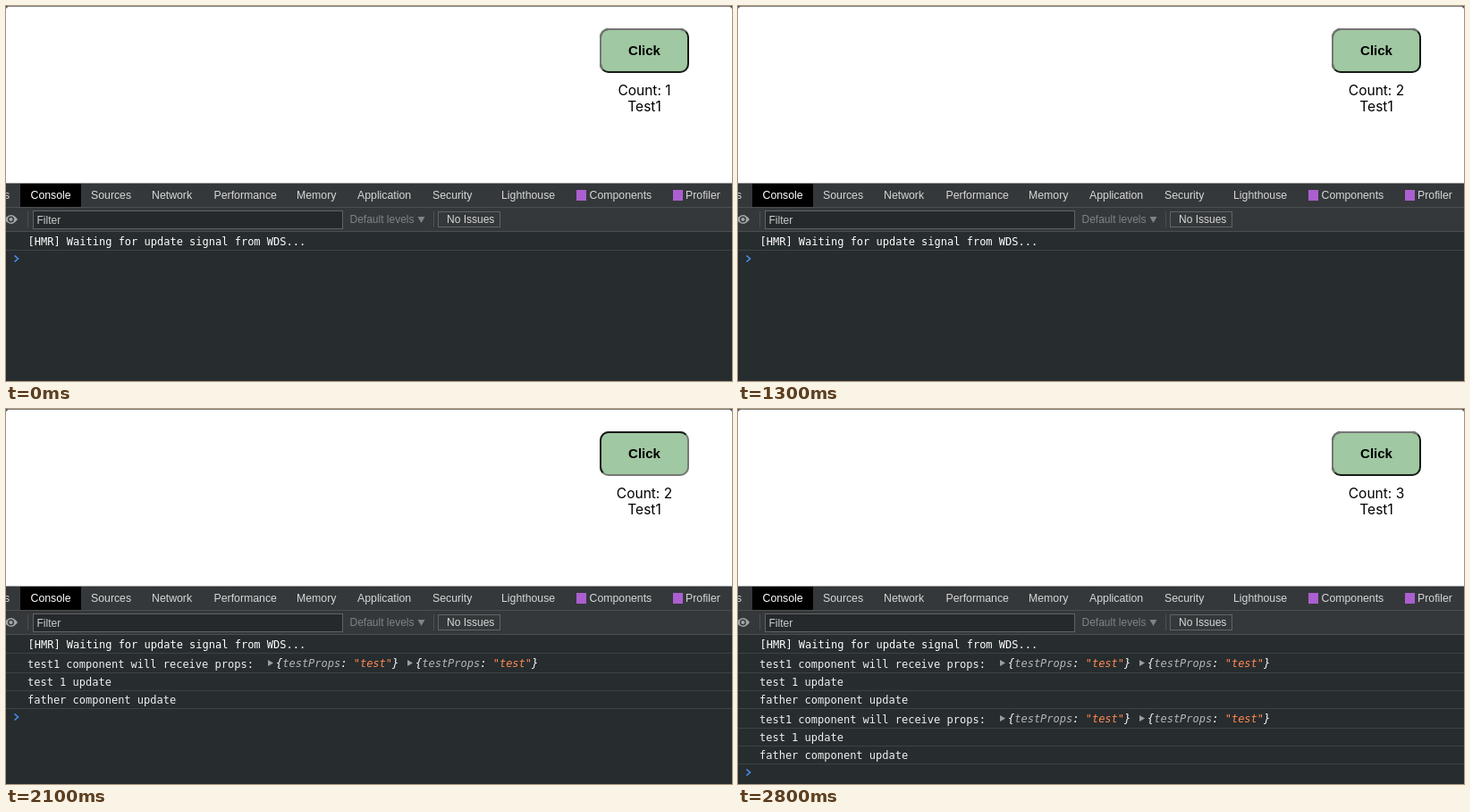
Animation of 812x420 px, one loop 3 s. Source, as an HTML page with a canvas:

```html
<!DOCTYPE html>
<html lang="en">
<head>
<meta charset="utf-8">
<title>Console updates</title>
<style>
  html, body { margin: 0; width: 100%; height: 100%; overflow: hidden; background: #fff; }
  canvas { display: block; }
</style>
</head>
<body>
<canvas id="stage" width="812" height="420"></canvas>
<script>
const W = 812, H = 420, LOOP = 3000;
const ctx = document.getElementById('stage').getContext('2d');

const SANS = '"Liberation Sans", Arial, sans-serif';
const MONO = '12px "DejaVu Sans Mono", monospace';
const PAGE = '15.5px Inter, sans-serif';
const UI = '12px ' + SANS;
const TAB = '12.3px ' + SANS;

const C = {
  body: '#272c2f', bar: '#35383a', line: '#4b4f51', row: '#3d4245',
  tab: '#d6d8d9', log: '#f0f1f2', bright: '#fff', dim: '#7f8385',
  key: '#b4b7b9', value: '#ff8a52', prompt: '#4a90f2', icon: '#ab5fd0', eye: '#a2a6a8'
};

// Start times of each click's effects
const COUNT_AT = [1300, 2200];
const LOG_AT = [1400, 2200];
const PRESS = [2100, 2200];

const TABS = [
  ['s', -2], ['Sources', 95], ['Network', 163], ['Performance', 232.5],
  ['Memory', 325], ['Application', 393], ['Security', 477],
  ['Lighthouse', 554], ['Components', 652.5], ['Profiler', 760]
];

function rect(x, y, w, h, color) {
  ctx.fillStyle = color;
  ctx.fillRect(x, y, w, h);
}

function frame(x, y, w, h, color) {
  ctx.strokeStyle = color;
  ctx.lineWidth = 1;
  ctx.strokeRect(x + 0.5, y + 0.5, w - 1, h - 1);
}

function text(str, x, y, font, color, align = 'left') {
  ctx.font = font;
  ctx.fillStyle = color;
  ctx.textAlign = align;
  ctx.fillText(str, x, y);
}

function poly(points, color) {
  ctx.beginPath();
  points.forEach(([x, y]) => ctx.lineTo(x, y));
  ctx.closePath();
  ctx.fillStyle = color;
  ctx.fill();
}

function drawButton(pressed) {
  const x = 664, y = 25, w = 100, h = 50, half = h / 2;
  const light = '#767676', dark = '#161a16';

  function outline(color) {
    ctx.beginPath();
    ctx.roundRect(x + 1, y + 1, w - 2, h - 2, 9);
    ctx.strokeStyle = color;
    ctx.lineWidth = 2;
    ctx.stroke();
  }

  ctx.beginPath();
  ctx.roundRect(x, y, w, h, 10);
  ctx.fillStyle = '#a0c8a2';
  ctx.fill();
  outline(pressed ? light : dark);

  // Top and left edges, mitred at the corners
  ctx.save();
  ctx.beginPath();
  ctx.moveTo(x, y);
  ctx.lineTo(x + w, y);
  ctx.lineTo(x + w - half, y + half);
  ctx.lineTo(x + half, y + half);
  ctx.lineTo(x, y + h);
  ctx.clip();
  outline(pressed ? dark : light);
  ctx.restore();

  text('Click', x + w / 2, 55, 'bold 15px ' + SANS, '#000', 'center');
}

function drawPage(count, pressed) {
  rect(0, 0, W, 198, '#fff');
  rect(0, 0, W, 1, '#858585');
  poly([[0, 0], [3, 0], [0, 3]], '#555');
  poly([[W, 0], [W - 3, 0], [W, 3]], '#555');
  drawButton(pressed);
  text('Count: ' + count, 714, 100, PAGE, '#000', 'center');
  text('Test1', 714, 118, PAGE, '#000', 'center');
}

function drawEye(x, y) {
  ctx.beginPath();
  ctx.moveTo(x - 7.5, y);
  ctx.quadraticCurveTo(x, y - 10, x + 7.5, y);
  ctx.quadraticCurveTo(x, y + 10, x - 7.5, y);
  ctx.fillStyle = C.eye;
  ctx.fill();
  [[3.5, C.bar], [2.1, C.eye]].forEach(([r, color]) => {
    ctx.beginPath();
    ctx.arc(x, y, r, 0, Math.PI * 2);
    ctx.fillStyle = color;
    ctx.fill();
  });
}

function drawToolbar() {
  rect(0, 198, W, 55, C.bar);
  rect(16, 199, 68, 26, '#000');
  rect(0, 198, W, 1, '#8f9192');
  rect(0, 225, W, 1, C.line);
  rect(0, 252, W, 1, C.line);
  TABS.forEach(([label, x]) => text(label, x, 216, TAB, C.tab));
  text('Console', 27.5, 216, TAB, C.bright);
  rect(638, 206, 11, 12, C.icon);
  rect(746, 206, 11, 12, C.icon);

  drawEye(5.5, 239);
  rect(24, 230, 1, 18, C.line);
  rect(30, 229, 347, 21, '#25292b');
  frame(30, 229, 347, 21, '#606466');
  text('Filter', 34.5, 244, UI, '#c9cccd');
  text('Default levels', 384.5, 243, UI, C.dim);
  poly([[460.5, 236], [468.5, 236], [464.5, 243]], C.dim);
  rect(478, 230, 1, 18, C.line);
  frame(483, 230, 70, 18, '#606466');
  text('No Issues', 493, 243, UI, C.tab);
}

function drawProps(x, y) {
  poly([[x, y - 8], [x + 6, y - 4.5], [x, y - 1]], '#9a9ea0');
  const parts = [
    ['{', C.bright], ['testProps', C.key], [': ', C.bright], ['"test"', C.value], ['}', C.bright]
  ];
  let at = x + 9;
  parts.forEach(([str, color]) => {
    text(str, at, y, 'italic ' + MONO, color);
    at += ctx.measureText(str).width;
  });
}

function drawLog(top) {
  text('test1 component will receive props:', 24, top + 17, MONO, C.log);
  drawProps(293, top + 16);
  drawProps(449, top + 16);
  text('test 1 update', 24, top + 37, MONO, C.log);
  text('father component update', 24, top + 57, MONO, C.log);
  [22, 42, 62].forEach(dy => rect(0, top + dy, W, 1, C.row));
}

function drawConsole(logs) {
  rect(0, 253, W, H - 253, C.body);
  text('[HMR] Waiting for update signal from WDS...', 24.5, 268, MONO, C.bright);
  rect(0, 273, W, 1, C.row);
  for (let i = 0; i < logs; i++) drawLog(273 + i * 62);

  const y = 283 + logs * 62;
  ctx.beginPath();
  ctx.moveTo(9.5, y - 3.5);
  ctx.lineTo(13.5, y);
  ctx.lineTo(9.5, y + 3.5);
  ctx.strokeStyle = C.prompt;
  ctx.lineWidth = 1.6;
  ctx.stroke();
}

const passed = (times, t) => times.filter(at => t >= at).length;

function render(t) {
  drawPage(1 + passed(COUNT_AT, t), t >= PRESS[0] && t < PRESS[1]);
  drawConsole(passed(LOG_AT, t));
  drawToolbar();
}

const start = performance.now();
function tick() {
  render((performance.now() - start) % LOOP);
  requestAnimationFrame(tick);
}
tick();
</script>
</body>
</html>
```
